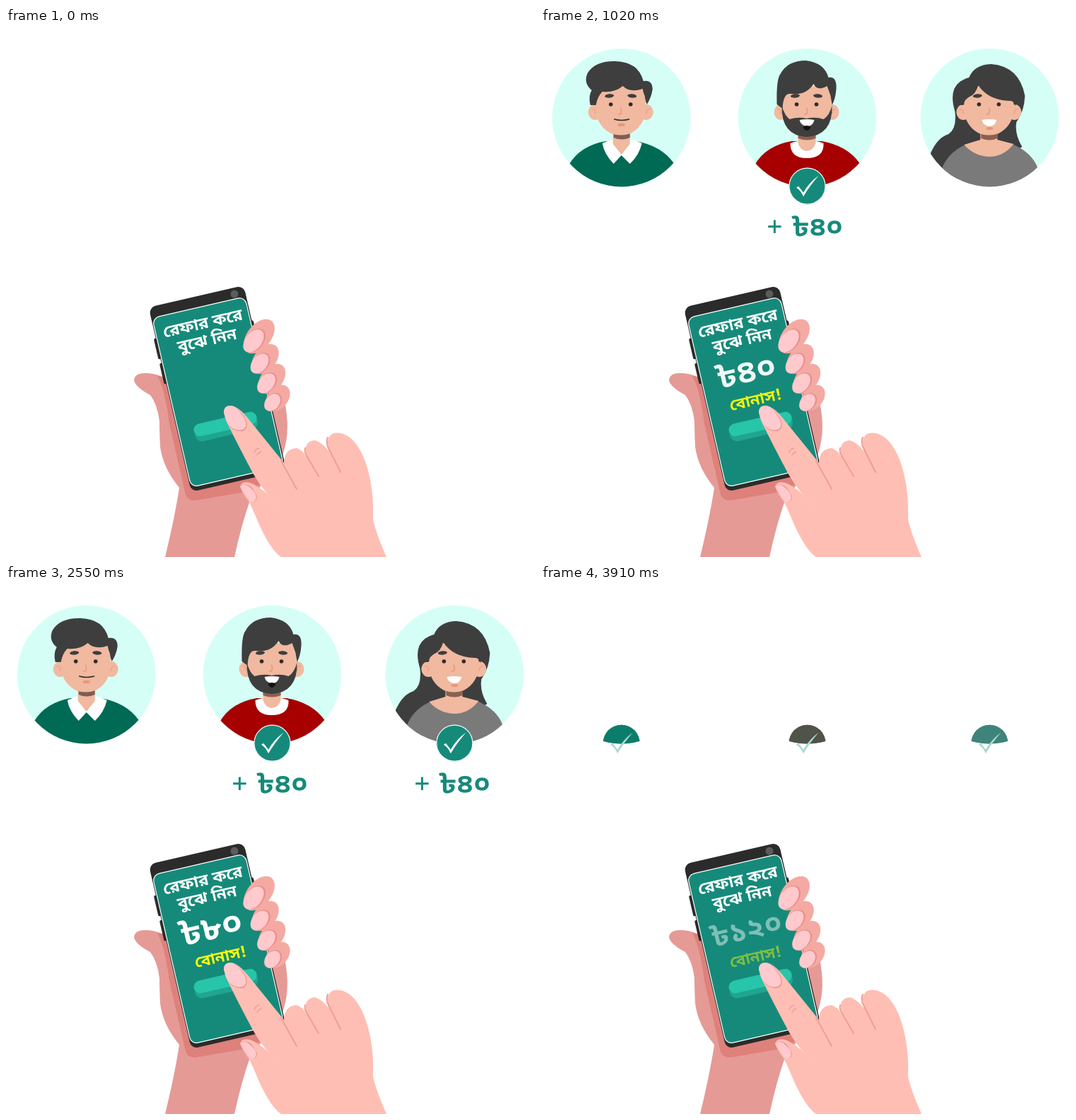
Animation of 748x748 px, one loop 4080 ms. Source, as an HTML page with a canvas:

```html
<!DOCTYPE html>
<html lang="bn">
<head>
<meta charset="utf-8">
<title>Refer and earn</title>
<style>
html, body { margin: 0; width: 100%; height: 100%; overflow: hidden; background: #fff; }
canvas { display: block; width: 748px; height: 748px; }
</style>
</head>
<body>
<canvas id="stage" width="748" height="748"></canvas>
<script>
const ctx = document.getElementById('stage').getContext('2d');
const LOOP = 4080, STEP = 170, TILT = -13 * Math.PI / 180;
const TEAL = '#168a7a', DARK = '#3e3e3e', SKIN = '#f0b9a0', BLUSH = '#e8957c';
const FONT = '"Noto Sans Bengali", "Noto Sans", sans-serif';

const clamp = v => Math.max(0, Math.min(1, v));
const easeOut = u => 1 - (1 - u) * (1 - u);

function fill(color, d) {
  ctx.fillStyle = color;
  ctx.fill(new Path2D(d));
}
function line(color, width, d) {
  ctx.strokeStyle = color;
  ctx.lineWidth = width;
  ctx.lineCap = 'round';
  ctx.stroke(new Path2D(d));
}
function oval(color, x, y, rx, ry = rx, turn = 0) {
  ctx.fillStyle = color;
  ctx.beginPath();
  ctx.ellipse(x, y, rx, ry, turn, 0, 7);
  ctx.fill();
}
function box(color, x, y, w, h, r) {
  ctx.fillStyle = color;
  ctx.beginPath();
  ctx.roundRect(x, y, w, h, r);
  ctx.fill();
}
function clipCircle(x, y, r) {
  ctx.beginPath();
  ctx.arc(x, y, r, 0, 7);
  ctx.clip();
}
function group(draw) {
  ctx.save();
  draw();
  ctx.restore();
}
function text(str, x, y, size, weight, color, turn = 0, scale = 1) {
  group(() => {
    ctx.translate(x, y);
    ctx.rotate(turn);
    ctx.scale(scale, scale);
    ctx.font = `${weight} ${size}px ${FONT}`;
    ctx.textAlign = 'center';
    ctx.fillStyle = color;
    ctx.fillText(str, 0, 0);
  });
}

// People: x is measured from the middle of the portrait
function head() {
  for (const s of [-1, 1]) {
    oval(SKIN, -1 + s * 36, 119, 10, 11);
    line(BLUSH, 1, `M${-1 + s * 41} 115Q${-1 + s * 36} 113 ${-1 + s * 36} 121`);
  }
  fill(SKIN, 'M-36 82H34V115Q33 138 13 149Q-1 154-15 149Q-35 138-36 115Z');
}
function features() {
  for (const s of [-1, 1]) {
    oval(DARK, -1 + s * 16, 96, 6.5, 2.7, s * 0.1);
    oval('#302b2b', -1 + s * 14, 108, 2.8);
  }
  line(BLUSH, 1.3, 'M-1 113Q2 122-4 122');
}
const SHOULDERS = 'M-90 225L-74 193Q-58 166-22 160H20Q56 166 74 191L90 225V245H-90Z';
const SMILE = 'M-11 130Q-1 128 10 130Q8 139-1 139Q-9 138-11 130Z';

function boy() {
  fill('#006a55', SHOULDERS);
  fill('#fff', 'M-27 163L-15 158H17L29 163Q25 180 12 192L0 180L-11 192Q-24 179-27 163Z');
  fill(SKIN, 'M-12 140H12V164L0 179L-12 164Z');
  fill('#7d5f52', 'M-11 147H12V155Q0 160-11 155Z');
  head();
  fill(DARK, 'M-44 109Q-47 96-42 88Q-54 78-48 64Q-37 46-8 47Q24 48 31 75Q44 73 44 87Q42 99 36 108Q34 104 33 96Q31 92 30 86Q12 92 2 82Q-10 92-27 90Q-34 97-36 109Z');
  features();
  line('#302b2b', 1.5, 'M-10 129Q0 132 11 129');
  oval(BLUSH, 0, 137, 5, 2.2);
}
function man() {
  fill('#a60000', SHOULDERS);
  fill('#fff', 'M-24 163Q-12 158-1 160Q12 158 23 163Q24 184-1 184Q-24 184-24 163Z');
  fill(SKIN, 'M-13 140H12V163Q8 174-1 174Q-10 173-13 163Z');
  fill('#8d604f', 'M-13 150H12V156Q0 161-13 156Z');
  head();
  fill(DARK, 'M-43 108Q-44 72-38 65Q-28 46-2 46Q24 49 30 70Q42 68 41 86Q40 100 35 109L33 96Q31 90 28 82Q14 90 9 79Q-2 96-24 93Q-34 92-35 114Z');
  fill(DARK, 'M-36 110Q-32 124-25 129Q-12 125-1 128Q12 125 23 129Q31 124 35 110Q36 152-1 154Q-37 152-36 110Z');
  features();
  fill('#fff', SMILE);
  fill('#171010', 'M-6 140Q-1 136 5 140Q3 145-1 145Q-5 144-6 140Z');
}
function woman() {
  fill(DARK, 'M-88 190Q-78 156-58 150Q-46 142-49 118Q-58 88-42 76Q-34 71-29 70Q-22 52 2 51Q42 54 50 96Q49 118 38 133Q35 150 46 168L10 190L-78 226Z');
  fill('#7a7a7a', 'M-74 235L-66 195Q-56 174-32 164H32Q60 176 68 198L80 235Z');
  fill(SKIN, 'M-36 165L-13 158V145H11V158L34 164Q20 182-1 182Q-22 181-36 165Z');
  fill('#8d604f', 'M-12 149H11V156Q0 161-12 156Z');
  head();
  fill(DARK, 'M-42 109Q-48 78-20 70Q20 52 38 88Q42 100 36 110Q34 102 28 103Q-2 102-16 81Q-20 94-28 97Q-36 101-37 109Z');
  features();
  fill('#fff', SMILE);
  oval(BLUSH, 0, 142, 5, 2);
}

// Each portrait with the start of the tap that rewards it and its entry zoom
const PEOPLE = [
  { x: 113.7, draw: boy, shirt: '#006a55', tap: 2550, zoom: 0.174 },
  { x: 376.5, draw: man, shirt: '#a60000', tap: 390, zoom: 0.045 },
  { x: 634.3, draw: woman, shirt: '#7a7a7a', tap: 1490, zoom: 0.174 }
];
const TOTALS = [[390, '৳৪০', 45], [1490, '৳৮০', 48], [2550, '৳১২০', 41]];

function portrait(p, t) {
  const entry = clamp((340 - t) / 170), scale = 1 + p.zoom * entry;
  group(() => {
    ctx.translate(p.x, 126.7);
    ctx.scale(scale, scale);
    ctx.translate(0, -126.7);
    clipCircle(0, 126.7, 97.8);
    ctx.fillStyle = '#d5fff6';
    ctx.fillRect(-100, 20, 200, 210);
    if (entry) ctx.filter = `blur(${2.4 * entry}px)`;
    p.draw();
  });
}

const CHECK = 'M-15.5 2Q-13 0-12 0.5L-5.5 9Q3-6 16-15Q3 0-5.5 14.5Q-9 6-15.5 2Z';

function badge(p, age) {
  if (age <= 0) return;
  const u = clamp(age / 260), r = 26 * easeOut(u);
  group(() => {
    ctx.translate(p.x, 223.7);
    group(() => {
      ctx.globalAlpha = Math.min(1, 4 * u * u);
      if (u < 1) {
        clipCircle(0, 0, r);
        ctx.filter = `blur(${5 * (1 - u)}px)`;
      }
      oval(TEAL, 0, 0, r);
    });
    if (u === 1) {
      ctx.strokeStyle = '#fff';
      ctx.lineWidth = 1.2;
      ctx.beginPath();
      ctx.arc(0, 0, 25.5, 0, 7);
      ctx.stroke();
    }
    const wipe = clamp((age - 230) / 350);
    ctx.beginPath();
    ctx.rect(-17, -17, 34 * wipe, 34);
    ctx.clip();
    fill('#fff', CHECK);
  });
  const show = clamp((age - 300) / 280);
  if (show) group(() => {
    const s = 1 + 0.14 * (1 - show);
    ctx.globalAlpha = show;
    ctx.translate(p.x - 5, 279);
    ctx.scale(s, s);
    text('+', -41, 15, 41, 400, TEAL);
    text('৳৪০', 19, 15, 38.5, 700, TEAL);
  });
}

// What is left of a badge while the portraits fade
function badgeRest(p) {
  group(() => {
    clipCircle(p.x, 126.7, 97.8);
    oval(p.shirt, p.x, 223.7, 26);
    ctx.globalAlpha = 0.6;
    oval(TEAL, p.x, 223.7, 26);
  });
  group(() => {
    ctx.translate(p.x, 223.7);
    fill('#a9d8d2', CHECK);
  });
}

function palm() {
  fill('#e59a96', 'M181 498Q182 488 196 488Q210 488 220 493L300 520L392 520Q402 560 395 590Q386 630 360 648L345 668Q333 702 323 748H225Q239 690 245 650Q222 622 218 592Q217 570 217 556Q214 532 204 519Q183 508 181 498Z');
  fill('#de817b', 'M214 492L222 493L300 600L362 640Q356 651 344 655L268 668Q258 669 254 660L231 560Q225 512 214 492Z');
}

function phone() {
  group(() => {
    ctx.translate(299, 510);
    ctx.rotate(TILT);
    box('#2b2b2b', -72, -89, 8, 30, 2);
    box('#2b2b2b', -72, -53, 8, 30, 2);
    box('#2b2b2b', 62, -83, 9, 26, 2);
    box('#2b2b2b', -69, -134, 138, 268, 10);
    oval('#5c5c5c', 53.5, -125, 5.5);
    box(TEAL, -67.5, -118, 134.5, 245.5, 10);
    ctx.strokeStyle = '#fff';
    ctx.lineWidth = 1.2;
    ctx.stroke();
  });
}

function grip() {
  // Centre, half length and half width of each finger
  const fingers = [[358, 436, 28, 17], [366.5, 468, 24, 15.5], [376, 496, 24, 15.5], [384.5, 523, 20.5, 14.5]];
  for (const [x, y, a, b] of fingers) {
    oval('#f4aaa3', x, y, a, b, -0.9);
    oval('#e98f8b', x - 6.5, y + 6, a * 0.69, b * 0.73, -0.9);
    oval('#ffc9cd', x - 8, y + 6.5, a * 0.66, b * 0.68, -0.9);
  }
}

function screen(t) {
  const fade = clamp((4050 - t) / 310);
  text('রেফার করে', 280, 425, 23, 700, '#fff', TILT);
  text('বুঝে নিন', 286, 449, 23, 700, '#fff', TILT);
  TOTALS.forEach(([start, label, size], i) => {
    const show = clamp((t - start - 330) / 320);
    const gone = i < 2 ? clamp((t - TOTALS[i + 1][0] - 150) / 180) : 0;
    if (!show || gone === 1) return;
    ctx.globalAlpha = show * (1 - gone) * fade;
    text(label, 293, 501, size, 700, '#fff', TILT, 1 + 0.15 * (1 - show));
  });
  const bonus = clamp((t - 720) / 320);
  ctx.globalAlpha = bonus * fade;
  if (bonus) text('বোনাস!', 305, 533, 22, 700, '#ff0', TILT, 1 + 0.15 * (1 - bonus));
  ctx.globalAlpha = 1;
}

function button(press) {
  group(() => {
    ctx.translate(311, 564);
    ctx.rotate(TILT);
    ctx.scale(1 - 0.11 * press, 1 - 0.11 * press);
    box('#1fa590', -45.5, -8.5, 91, 21, 10.5);
    box('#27c5a9', -45.5, -13, 91, 18, 9);
  });
}

function hand(press) {
  const flesh = '#ffbeb3', crease = '#ee9e98';
  group(() => {
    ctx.translate(0, 640);
    ctx.scale(1, 1 - 0.085 * press);
    ctx.translate(0, -640);
    fill(flesh, 'M308 543Q308 534 318 534Q329 535 343 553L394 616L440 690L386 675Q364 656 350 631Q329 592 311 555Z');
    fill('#e99a97', 'M309 543L319 536Q330 537 340 555Q343 567 335 570Q324 571 317 564Z');
    fill('#ffcacd', 'M308 543Q308 534 318 534Q328 536 338 554Q342 565 334 568Q324 570 317 563Q310 555 308 543Z');
    line(crease, 1.5, 'M351 600Q353 595 358 594M355 604Q357 600 361 599');
  });
  fill(flesh, 'M331 648Q334 640 345 643Q362 649 386 675L400 640L393 614Q394 595 411 594Q420 597 424 606Q420 584 437 583Q447 586 456 598Q451 573 468 572.5C504 573 522 640 519 695Q523 714 538 748H389Q374 738 357 700Q348 678 343 669Q333 656 331 648Z');
  fill('#e99a97', 'M331 647Q340 643 348 650L355 662Q355 670 347 671Z');
  fill('#ffcacd', 'M331 648Q338 643 345 650Q353 656 354 664Q352 671 346 671Q339 660 331 648Z');
  line(crease, 2, 'M389 612L411 652M423 600Q422 596 423 594M423 601L442 634M454 588Q453 583 455 579M454 590L473 628');
}

function paint(t) {
  ctx.fillStyle = '#fff';
  ctx.fillRect(0, 0, 748, 748);
  const present = t >= 170 && t < 3910;
  for (const p of PEOPLE) {
    if (present) {
      portrait(p, t);
      badge(p, t - p.tap);
    } else if (t >= 3910) badgeRest(p);
  }
  const press = Math.max(...PEOPLE.map(p => Math.sin(Math.PI * clamp((t - p.tap) / 370))));
  palm();
  phone();
  grip();
  screen(t);
  button(press);
  hand(press);
}

const begin = performance.now();
function tick() {
  const t = (performance.now() - begin) % LOOP;
  paint(Math.floor(t / STEP) * STEP);
  requestAnimationFrame(tick);
}
tick();
</script>
</body>
</html>
```
